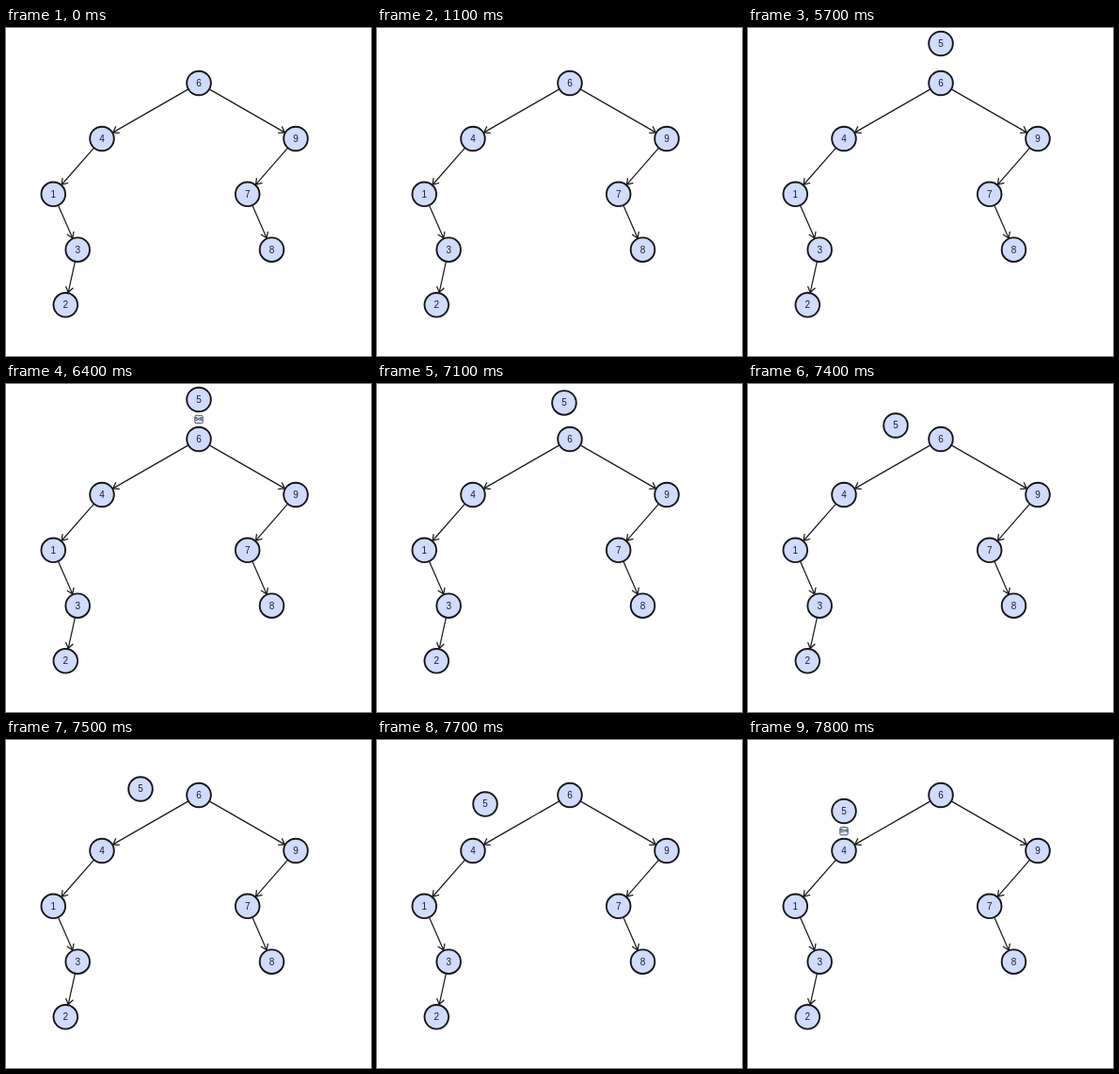
An HTML page for the animation above (8 s loop, 388x348 px).

```html
<!DOCTYPE html>
<html lang="en">
<head>
<meta charset="utf-8">
<title>Tree insertion</title>
<style>
  html, body { margin: 0; width: 100%; height: 100%; overflow: hidden; background: #fff; }
  svg { display: block; width: 388px; height: 348px; }
  circle { fill: #d0dbfe; stroke: #161616; stroke-width: 1.9; }
  rect { fill: #dfe6fa; stroke: #4c5261; stroke-width: 1; }
  path { fill: none; stroke: #1c1c1c; stroke-width: 1.25; }
  text { font: 10px "Liberation Sans", Arial, sans-serif; fill: #1c1f2a; text-anchor: middle; }
  .sign text { font-size: 4.5px; font-weight: bold; }
</style>
</head>
<body>
<svg id="stage" viewBox="0 0 388 348"></svg>
<script>
const LOOP = 8000, STEP = 100, R = 12.8;
const stage = document.getElementById('stage');
const nodes = {
  6: [205, 58.5], 4: [102, 117.5], 9: [308, 117.5], 1: [50.3, 176.3],
  7: [256.7, 176.3], 3: [76.2, 235.2], 8: [282.5, 235.2], 2: [63.3, 293.8]
};
const edges = [[6, 4], [6, 9], [4, 1], [9, 7], [1, 3], [7, 8], [3, 2]];
const start = [205, 16.5], end = [102, 75.5];

function add(parent, tag, attrs = {}, label) {
  const el = document.createElementNS('http://www.w3.org/2000/svg', tag);
  for (const key in attrs) el.setAttribute(key, attrs[key]);
  if (label !== undefined) el.textContent = label;
  return parent.appendChild(el);
}

function move(el, [x, y]) {
  el.setAttribute('transform', `translate(${x} ${y})`);
}

function addNode(label, pos) {
  const g = add(stage, 'g');
  add(g, 'circle', { r: R });
  add(g, 'text', { y: 3.4 }, label);
  move(g, pos);
  return g;
}

function addSign(label, pos) {
  const g = add(stage, 'g', { class: 'sign' });
  add(g, 'rect', { x: -4.2, y: -4.2, width: 8.4, height: 8.4, rx: 1.5 });
  add(g, 'text', { y: 1.6 }, label);
  move(g, pos);
  return g;
}

function addEdge(a, b) {
  const [x1, y1] = nodes[a], [x2, y2] = nodes[b];
  const angle = Math.atan2(y2 - y1, x2 - x1) * 180 / Math.PI;
  const tip = Math.hypot(x2 - x1, y2 - y1) - R - 0.6;
  add(stage, 'path', {
    d: `M${R} 0H${tip}M${tip - 6} -4L${tip} 0L${tip - 6} 4`,
    transform: `translate(${x1} ${y1}) rotate(${angle})`
  });
}

edges.forEach(([a, b]) => addEdge(a, b));
for (const key in nodes) addNode(key, nodes[key]);
const fresh = addNode(5, start);
const less = addSign('5<6', [205, 37.5]);
const more = addSign('5>4', [102, 96.7]);

function show(el, on) {
  el.setAttribute('visibility', on ? 'visible' : 'hidden');
}

function draw(ms) {
  const t = Math.floor(ms % LOOP / STEP) * STEP;
  const p = Math.min(1, Math.max(0, (t - 7057) / 736));
  show(fresh, t >= 5700);
  show(less, t >= 6400 && t < 7100);
  show(more, t >= 7800);
  move(fresh, start.map((v, i) => v + (end[i] - v) * p));
}

let origin;
function tick(now) {
  origin ??= now;
  draw(now - origin);
  requestAnimationFrame(tick);
}
draw(0);
requestAnimationFrame(tick);
</script>
</body>
</html>
```
